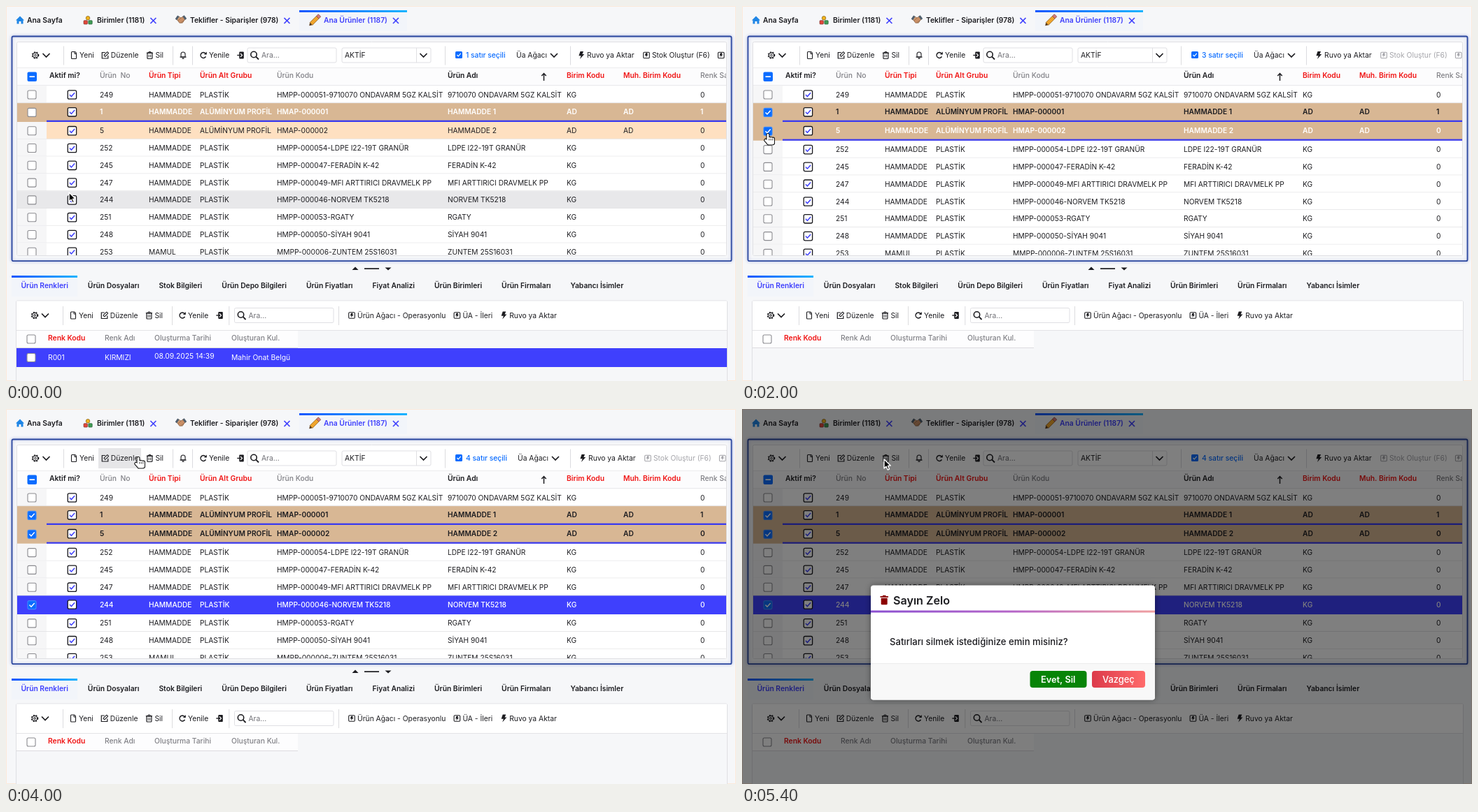
Animation of 1043x537 px, one loop 5.6 s. Source, as an HTML page with a canvas:

```html
<!DOCTYPE html>
<html lang="tr">
<head>
<meta charset="utf-8">
<style>
html, body { margin: 0; width: 100%; height: 100%; overflow: hidden; background: #f6f7f9; }
canvas { display: block; width: 1043px; height: 537px; }
</style>
</head>
<body>
<canvas id="stage"></canvas>
<script>
const W = 1043, H = 537, LOOP = 5600, STEP = 200;
const canvas = document.getElementById('stage');
const ctx = canvas.getContext('2d');
const dpr = window.devicePixelRatio || 1;
canvas.width = W * dpr;
canvas.height = H * dpr;

const INK = '#1c1c20', RED = '#f01414', GREY = '#808086', PALE = '#a5a5aa', EDGE = '#dfdfe3';
const PAGE = '#f6f7f9', BLUE = '#3f40fd', ACCENT = '#0a6cff', TAN = '#d8b794', PEACH = '#fee0c1';

const COLUMNS = [
  [62, 'Aktif mi?', INK], [134, 'Ürün  No', GREY], [204, 'Ürün Tipi', RED], [277, 'Ürün Alt Grubu', RED],
  [387, 'Ürün Kodu', GREY], [631, 'Ürün Adı', INK], [801, 'Birim Kodu', RED], [882, 'Muh. Birim Kodu', RED],
  [992, 'Renk Sayısı', GREY]
];
const ROWS = `249 HMPP-000051 9710070 ONDAVARM 5GZ KALSİT
1 HMAP-000001 HAMMADDE 1
5 HMAP-000002 HAMMADDE 2
252 HMPP-000054 LDPE I22-19T GRANÜR
245 HMPP-000047 FERADİN K-42
247 HMPP-000049 MFI ARTTIRICI DRAVMELK PP
244 HMPP-000046 NORVEM TK5218
251 HMPP-000053 RGATY
248 HMPP-000050 SİYAH 9041
253 MMPP-000006 ZUNTEM 25S16031`.split('\n').map(s => s.match(/^(\S+) (\S+) (.+)$/).slice(1));

const CLICKS = { 1: 1000, 5: 2000, 244: 3000 };
const DIALOG_AT = 5000, FADE = 400;
// arrival time and place of the pointer
const STOPS = [
  [0, 90, 267], [800, 37, 157], [1600, 37, 183], [2400, 47, 252], [2800, 38, 274], [4000, 189, 69], [4600, 203, 72]
];

function rect(x, y, w, h, color) {
  ctx.fillStyle = color;
  ctx.fillRect(x, y, w, h);
}
function paint(fill, stroke, lw) {
  if (fill) { ctx.fillStyle = fill; ctx.fill(); }
  if (stroke) { ctx.strokeStyle = stroke; ctx.lineWidth = lw; ctx.stroke(); }
}
function round(x, y, w, h, r, fill, stroke, lw = 1) {
  ctx.beginPath();
  ctx.roundRect(x, y, w, h, r);
  paint(fill, stroke, lw);
}
function circle(x, y, r, fill, stroke, lw = 1.2) {
  ctx.beginPath();
  ctx.arc(x, y, r, 0, 7);
  paint(fill, stroke, lw);
}
function line(points, color = INK, lw = 1.2) {
  ctx.beginPath();
  points.forEach(p => ctx.lineTo(...p));
  paint(null, color, lw);
}
function shape(points, fill = INK, stroke, lw = 1) {
  ctx.beginPath();
  points.forEach(p => ctx.lineTo(...p));
  ctx.closePath();
  paint(fill, stroke, lw);
}
// y is the middle of the capitals; returns the right end
function text(s, x, y, color = INK, weight = 400, size = 10.3) {
  ctx.font = `${weight} ${size}px Inter, sans-serif`;
  ctx.fillStyle = color;
  ctx.fillText(s, x, y + size * 0.364);
  return x + ctx.measureText(s).width;
}
function gradient(x, w, ...colors) {
  const g = ctx.createLinearGradient(x, 0, x + w, 0);
  colors.forEach((c, i) => g.addColorStop(i / (colors.length - 1), c));
  return g;
}
function at(x, y, draw, angle = 0) {
  ctx.save();
  ctx.translate(x, y);
  ctx.rotate(angle);
  draw();
  ctx.restore();
}
function glow(color, blur, draw) {
  ctx.save();
  ctx.shadowColor = color;
  ctx.shadowBlur = blur * dpr;
  draw();
  ctx.restore();
}

const divider = (x, y) => rect(x, y - 13, 1, 27, '#dcdcdf');
const chevron = (x, y) => line([[x - 5, y - 2.5], [x, y + 2.5], [x + 5, y - 2.5]], INK, 1.7);
const tick = (x, y, color) => line([[x - 3.5, y], [x - 1, y + 2.6], [x + 3.7, y - 2.7]], color, 1.5);
const cross = (x, y) => [-4, 4].forEach(d => line([[x - d, y - 4], [x + d, y + 4]], BLUE, 1.7));
function activeTab(x, y, w) {
  rect(x, y, w, 30, '#f2f5fa');
  rect(x, y, w, 3, gradient(x, w, '#1557ff', '#1bb4ff'));
}
function selectBox(x, y, checked) {
  round(x - 6, y - 6, 12, 12, 2, checked ? ACCENT : '#fff', checked ? '#3b8bff' : '#8b8b90', 1.1);
  if (checked) tick(x, y, '#fff');
}

const icons = {
  gear() {
    ctx.setLineDash([1.9, 1.9]);
    circle(0, 0, 4.6, null, INK, 1.4);
    ctx.setLineDash([]);
    circle(0, 0, 3.6, null, INK, 1.1);
    circle(0, 0, 1.4, null, INK, 1);
  },
  file() {
    round(-3.5, -5, 7, 10, [1, 3, 1, 1], null, INK, 1.1);
    line([[1, -5], [1, -2], [3.5, -2]], INK, 1);
  },
  edit() {
    line([[0, -4], [-4.5, -4], [-4.5, 4.5], [4, 4.5], [4, 0.5]]);
    at(1.5, -1.5, () => round(-3.5, -1.3, 7, 2.6, 0.5, '#fff', INK, 1.1), -Math.PI / 4);
  },
  trash() {
    round(-1.6, -5, 3.2, 2, 0.5, null, INK);
    line([[-4.6, -3.3], [4.6, -3.3]]);
    round(-3.5, -3.3, 7, 8.3, 1, null, INK, 1.2);
    [-1.2, 1.2].forEach(x => line([[x, -1], [x, 3]], INK, 0.9));
  },
  bell() {
    round(-3, -4.5, 6, 7, [3, 3, 0, 0], null, INK, 1.1);
    line([[-4.5, 2.6], [4.5, 2.6]]);
    line([[-1.5, 4.6], [1.5, 4.6]], INK, 1.4);
  },
  refresh() {
    ctx.beginPath();
    ctx.arc(0, 0, 3.9, 0.5, 5.5);
    paint(null, INK, 1.5);
    shape([[4.8, -5], [4.8, -1], [0.8, -1]]);
  },
  export() {
    round(-2, -5, 6.5, 10, 1, INK);
    line([[-5, 0], [0, 0]], INK, 1.4);
    line([[-0.3, -2.5], [2.2, 0], [-0.3, 2.5]], '#fff');
  },
  search() {
    circle(-1, -1, 4.2, null, INK, 1.6);
    line([[2.2, 2.2], [6, 6]], INK, 1.8);
  },
  bolt(color = INK) {
    shape([[-1.5, -5.5], [3, -5.5], [1.4, -1.6], [4.2, -1.6], [-2, 5.5], [-0.4, 0.7], [-3.6, 0.7]], color);
  },
  box(color = INK) {
    round(-4.3, -4.3, 8.6, 8.6, 1.2, null, color, 1.1);
    ctx.scale(0.6, 0.6);
    icons.bolt(color);
  },
  home() {
    const blue = '#1f86e6';
    shape([[-6, 0], [0, -6], [6, 0]], blue);
    [-4.5, 1.5].forEach(x => rect(x, -0.5, 3, 5.5, blue));
    rect(-3, -1, 6, 2.5, blue);
  },
  blocks() {
    circle(0, -3.2, 2.8, '#f3b51d', '#6a4b12', 0.6);
    round(-6, 0.2, 5.4, 5.4, 1, '#e2483b', '#6d2620', 0.6);
    round(0.8, 0.2, 5.4, 5.4, 1, '#3f9d55', '#20522c', 0.6);
  },
  hands() {
    ['#d9a57c', '#c98f66'].forEach((skin, i) => at(0, 0, () => {
      round(-7, -2.8, 11, 5.6, 2, skin, '#7d5638', 0.6);
      rect(-8, -3, 3, 6, '#51606e');
    }, 0.6 + 1.9 * i));
  },
  pencil() {
    at(0, 0, () => {
      shape([[-11, 0], [-7, -2.6], [-7, 2.6]], '#5a3a1a');
      round(-7, -2.6, 13, 5.2, 0, '#f0a52c', '#8a5a16', 0.7);
      round(6, -2.6, 4, 5.2, 1, '#d77b76', '#6f3a32', 0.6);
    }, -Math.PI / 4);
  }
};
const put = (name, x, y, color) => at(x, y, () => icons[name](color));

// Lays out icons with optional labels; '|' is a divider
function flow(x, y, items, color) {
  for (const item of items) {
    const [name, ...words] = item.split(' ');
    if (name === '|') {
      divider(x - 3, y);
      x += 12;
    } else {
      put(name, x, y, color);
      x += words.length ? text(words.join(' '), x + 8, y, color) - x + 16 : 16;
    }
  }
}
const TOOLS = ['file Yeni', 'edit Düzenle', 'trash Sil', '|'];

function searchBox(x, y, w) {
  round(x, y - 10.5, w, 21, 2, '#fff', EDGE);
  put('search', x + 10, y);
  text('Ara...', x + 20, y, '#707076');
}

function topTabs() {
  const y = 20.5;
  activeTab(419, 6, 154);
  const tabs = [['home', 20, 'Ana Sayfa'], ['blocks', 117, 'Birimler (1181)'],
    ['hands', 250, 'Teklifler - Siparişler (978)'], ['pencil', 441, 'Ana Ürünler (1187)']];
  tabs.forEach(([name, x, label], i) => {
    put(name, x, y);
    const end = text(label, x + (i ? 13 : 10), y, i === 3 ? BLUE : INK, 600);
    if (i) cross(end + 12, y + 0.5);
  });
}

function upperToolbar(count, hover) {
  const y = 70.5, shift = count > 1 ? 2 : 0, stock = shift ? PALE : INK;
  if (hover) rect(hover.x, 56, hover.w, 29, '#e6e6e8');
  put('gear', 42, y);
  chevron(57.5, y);
  divider(82, y);
  flow(97, y, [...TOOLS, 'bell', '|']);
  flow(282, y, ['refresh Yenile', 'export']);
  searchBox(345, y, 127);
  round(480, 60, 127, 21, 2, '#fff', EDGE);
  rect(586, 60, 1, 21, EDGE);
  text('AKTİF', 484, y);
  chevron(596.5, y);
  divider(627, y);
  round(642, 65, 10, 10, 1.5, ACCENT);
  at(647, 70, () => { ctx.scale(0.75, 0.75); tick(0, 0, '#fff'); });
  text(`${count} satır seçili`, 657, y, ACCENT, 500);
  text('Üa Ağacı', 729 + shift, y);
  chevron(783 + shift, y);
  divider(806, y);
  flow(822 + shift, y, ['bolt Ruvo ya Aktar']);
  flow(915 + shift, y, ['box Stok Oluştur (F6)', 'box'], stock);
}

function gridHeader() {
  rect(16, 88, 1014, 26, '#fcfcfd');
  rect(16, 88, 1014, 1, '#ececee');
  rect(16, 113.5, 1014, 1, '#dcdcdf');
  round(30.5, 94.5, 13.5, 13.5, 2, ACCENT);
  line([[33.5, 101.2], [41, 101.2]], '#fff', 1.7);
  COLUMNS.forEach(([x, label, color]) => text(label, x, 99.7, color, color === GREY ? 500 : 600));
  line([[768.5, 107], [768.5, 97]], INK, 1.5);
  line([[765.3, 100], [768.5, 96.5], [771.7, 100]], INK, 1.5);
}

// A row opens up by two pixels once it is chosen
function layoutRows(t) {
  const active = t < CLICKS[5] ? '1' : t < CLICKS[244] ? '5' : '244';
  let bottom = 114.3;
  return ROWS.map(([no, code, name]) => {
    const checked = t >= CLICKS[no], chosen = checked || no === active;
    const y = bottom, h = chosen ? 26.9 : 24.8;
    bottom += h;
    return { no, code, name, checked, chosen, active: no === active, y, h };
  });
}

function drawRow({ no, code, name, checked, chosen, active, y, h }, hovered) {
  const profile = code.startsWith('HMAP'), mid = y + 12.5;
  rect(16, y, 1014, h, chosen ? (profile ? TAN : BLUE) : profile ? PEACH : hovered ? '#e8e8ea' : '#fff');
  if (!chosen && !hovered) rect(16, y, 42, h, '#f6f6f7');
  if (!chosen) rect(16, y + h - 0.9, 1014, 0.9, '#e4e4e6');
  else if (profile) rect(58, y + h - 2.3, 972, 2.3, '#3a3af0');

  selectBox(37, mid + (chosen ? 0.8 : 0.2), checked);
  round(88.2, mid - 6, 12.4, 12.4, 2, '#fff', '#17171c', 1.3);
  tick(94.4, mid + 0.2, BLUE);

  const type = code[0] === 'H' ? 'HAMMADDE' : 'MAMUL';
  const cells = profile
    ? ['', no, type, 'ALÜMİNYUM PROFİL', code, name, 'AD', 'AD', no === '1' ? 1 : 0]
    : ['', no, type, 'PLASTİK', `${code}-${name}`, name, 'KG', '', 0];
  const weight = !chosen ? 400 : profile ? 600 : 500;
  cells.forEach((s, i) => text(s, COLUMNS[i][0], mid, active ? '#fff' : INK, weight, 10.2));
}

function upperPanel(t, rows, mouse, hover, open) {
  glow('rgba(50,80,190,.3)', 4, () => round(8.5, 43.5, 1028, 321.7, 2, PAGE, '#2c489f', 1.8));
  round(15.5, 51.5, 1014, 306, 2, '#fff', EDGE);
  ctx.save();
  ctx.beginPath();
  ctx.rect(16, 52, 1013, 305);
  ctx.clip();
  upperToolbar(1 + Object.values(CLICKS).filter(c => t >= c).length, hover);
  gridHeader();
  rows.forEach(r => drawRow(r, !open && mouse.y >= r.y && mouse.y < r.y + r.h));
  ctx.restore();
}

function lowerPanel(showRow) {
  shape([[494.5, 378], [499, 373.5], [503.5, 378]]);
  rect(512, 375.3, 21, 1.7, INK);
  shape([[541.5, 374.5], [546, 378.5], [550.5, 374.5]]);

  activeTab(8, 386, 94);
  const tabs = ['Ürün Renkleri', 'Ürün Dosyaları', 'Stok Bilgileri', 'Ürün Depo Bilgileri', 'Ürün Fiyatları',
    'Fiyat Analizi', 'Ürün Birimleri', 'Ürün Firmaları', 'Yabancı İsimler'];
  tabs.reduce((x, s, i) => text(s, x, 400.5, i ? INK : BLUE, 600) + 28, 21.5);

  const y = 443;
  round(14.5, 422, 1016, 125, 2, PAGE, EDGE);
  rect(15, 422.5, 1015, 42, '#fff');
  rect(15, 464, 1015, 1, '#e4e4e7');
  put('gear', 41, y);
  chevron(56, y);
  divider(81, y);
  flow(96, y, [...TOOLS, 'refresh Yenile', 'export', '|']);
  searchBox(326.5, y, 141.5);
  divider(475, y);
  flow(494, y, ['box Ürün Ağacı - Operasyonlu', 'box ÜA - İleri', 'bolt Ruvo ya Aktar']);

  rect(15, 465, 402, 25, '#fdfdfe');
  rect(15, 489, 402, 1, '#dcdcdf');
  selectBox(36, 477);
  if (showRow) {
    rect(15, 490, 1015, 27, BLUE);
    selectBox(36, 503.5);
  }
  const fields = [[60, 'Renk Kodu', 'R001'], [141, 'Renk Adı', 'KIRMIZI'],
    [212, 'Oluşturma Tarihi', '08.09.2025 14:39'], [322, 'Oluşturan Kul.', 'Mahir Onat Belgü']];
  fields.forEach(([x, label, value], i) => {
    text(label, x, 475.5, i ? GREY : RED, i ? 500 : 600);
    if (showRow) text(value, x, i === 2 ? 501.5 : 503, '#fff');
  });
}

function dialog(alpha) {
  const x = 184, w = 406, maroon = '#8b0000';
  ctx.globalAlpha = alpha;
  rect(0, 0, W, H, 'rgba(0,0,0,.5)');
  glow('rgba(0,0,0,.4)', 8, () => round(x, 252.5, w, 164, 4, '#fff'));
  round(x, 364, w, 52.5, [0, 0, 4, 4], '#f8f8f8');
  rect(x, 364, w, 1, '#ececec');
  rect(x, 288.5, w, 3, gradient(x, w, '#8a4fd0', '#b565c8', '#f0a0a0'));
  rect(197.5, 268, 11.5, 1.8, maroon);
  rect(201, 266.8, 4.5, 1.5, maroon);
  round(198.7, 270.7, 9, 9.5, [0, 0, 1.5, 1.5], maroon);
  text('Sayın Zelo', 216, 274, INK, 600, 16.1);
  text('Satırları silmek istediğinize emin misiniz?', 211, 333.5, INK, 500, 13.1);
  round(411.5, 375, 81, 24, 4, '#078407');
  text('Evet, Sil', 427, 387, '#fff', 600, 12.8);
  round(500, 375, 76, 24, 4, gradient(500, 76, '#dc3a4a', '#ff6b6b'));
  text('Vazgeç', 515, 387, '#fff', 500, 12.9);
  ctx.globalAlpha = 1;
}

// Rests at each stop; a longer way takes longer
function mouseAt(t) {
  const next = STOPS.findIndex(s => s[0] > t);
  if (next < 0) return { x: STOPS.at(-1)[1], y: STOPS.at(-1)[2] };
  const [t0, x0, y0] = STOPS[next - 1], [t1, x1, y1] = STOPS[next];
  const time = Math.min(t1 - t0, 250 + 2 * Math.hypot(x1 - x0, y1 - y0));
  const u = Math.max(0, 1 - (t1 - t) / time), e = u * u * (3 - 2 * u);
  return { x: x0 + (x1 - x0) * e, y: y0 + (y1 - y0) * e };
}

function arrow() {
  ctx.lineJoin = 'round';
  shape([[0, 0], [0, 13], [3, 10.3], [5.2, 15], [7.5, 14], [5.4, 9.4], [9.2, 9]], '#000', '#fff', 1.4);
}
function hand() {
  const outline = (fill, stroke) => {
    at(-2.5, 10, () => round(-2.5, -1.5, 6, 3, 1.5, fill, stroke, 2.2), 0.8);
    for (let i = 0; i < 4; i++) round(-1.4 + 2.5 * i, i ? 4.5 + 0.4 * i : 0, 2.8, 9, 1.4, fill, stroke, 2.2);
    round(-1.4, 8, 10.3, 7.5, [0, 0, 3, 3], fill, stroke, 2.2);
  };
  outline(null, '#111');
  outline('#fff');
  for (let i = 1; i < 4; i++) line([[2.5 * i - 0.7, 7], [2.5 * i - 0.7, 9.5]], '#111', 0.8);
}

function draw(t) {
  const fade = Math.max(0, (t - DIALOG_AT) / FADE), open = fade > 0;
  const mouse = mouseAt(t);
  const buttons = [{ x: 132, w: 61 }, { x: 196, w: 32 }];
  const inBar = !open && mouse.y > 56 && mouse.y < 85;
  const hover = inBar && buttons.find(b => mouse.x > b.x && mouse.x < b.x + b.w);
  const onBox = !open && Math.abs(mouse.x - 37) < 7 && mouse.y > 114;

  ctx.setTransform(dpr, 0, 0, dpr, 0, 0);
  rect(0, 0, W, H, PAGE);
  round(0.5, 0.5, W - 1, H - 1, 0, null, '#fbe9da');
  topTabs();
  upperPanel(t, layoutRows(t), mouse, hover, open);
  lowerPanel(t < CLICKS[5]);
  if (open) dialog(fade);
  at(mouse.x, mouse.y, hover || onBox ? hand : arrow);
}

function loop(now) {
  draw(Math.floor((now % LOOP) / STEP) * STEP);
  requestAnimationFrame(loop);
}
requestAnimationFrame(loop);
</script>
</body>
</html>
```
